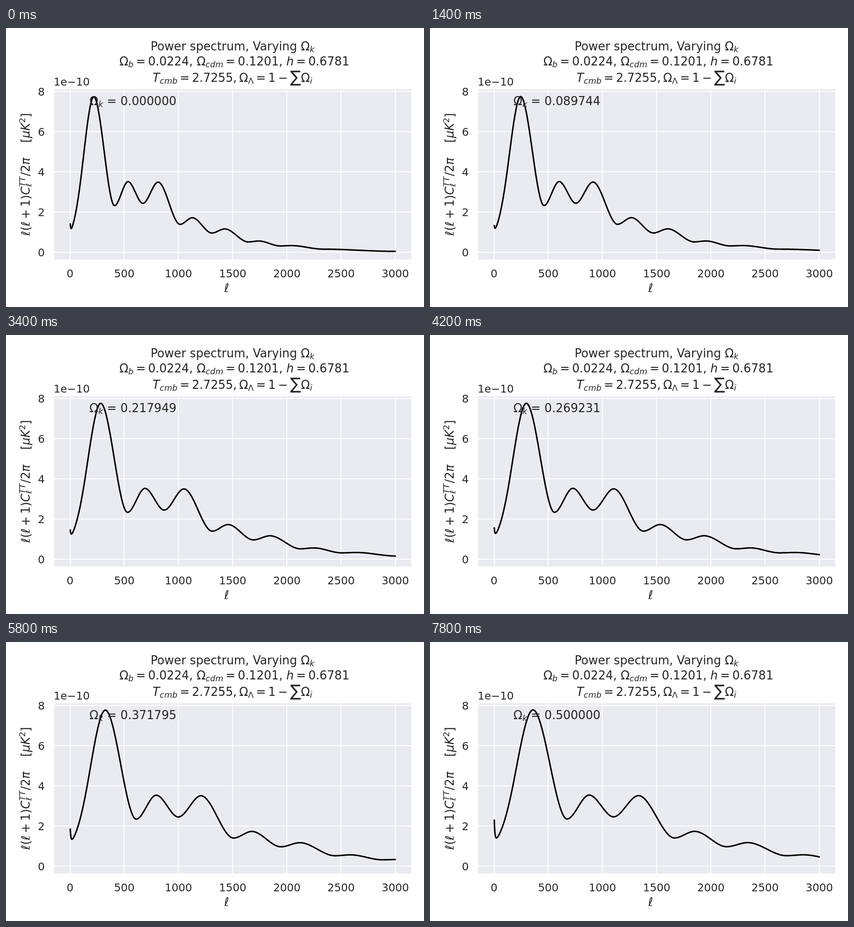
An HTML page that plays this animation: 917 by 611 pixels, repeating every 8000 ms.

```html
<!DOCTYPE html>
<html lang="en">
<head>
<meta charset="utf-8">
<title>Power spectrum</title>
<style>
  html, body { margin: 0; width: 100%; height: 100%; overflow: hidden; background: #fff; }
  svg { display: block; }
  text { font: 25.75px "DejaVu Sans", sans-serif; fill: #262626; white-space: pre; }
  .mid { text-anchor: middle; }
  .end { text-anchor: end; }
  .tick { font-size: 23.6px; }
  .it { font-style: italic; }
  .sub, .sup { font-size: 18px; baseline-shift: -4px; }
  .sup { baseline-shift: 10px; }
</style>
</head>
<body>
<svg id="stage" width="917" height="611" viewBox="0 0 917 611">
  <rect x="106" y="134" width="783" height="373" fill="#eaeaf1"/>
  <path id="grid" stroke="#fff" stroke-width="2.1"/>
  <path id="curve" fill="none" stroke="#000" stroke-width="3.2" stroke-linecap="round" stroke-linejoin="round"/>

  <!-- Thin spaces surround the operators -->
  <text x="497" y="49" class="mid">Power spectrum, Varying Ω<tspan class="sub it">k</tspan></text>
  <text x="501" y="81.5" class="mid">Ω<tspan class="sub it">b</tspan>&#8201;=&#8201;0.0224, Ω<tspan class="sub it">cdm</tspan>&#8201;=&#8201;0.1201, <tspan class="it">h</tspan>&#8201;=&#8201;0.6781</text>
  <text x="321.5" y="117.5"><tspan class="it">T</tspan><tspan class="sub it">cmb</tspan>&#8201;=&#8201;2.7255,&#8201;Ω<tspan class="sub">Λ</tspan>&#8201;=&#8201;1&#8201;−<tspan x="647">Ω</tspan><tspan class="sub it">i</tspan></text>
  <path fill="#262626" d="M624 93.5H645.5V97H629.5L640 109L629 122.5H646.5V126H623.5V123.5L635.5 109.5L624 96Z"/>
  <text transform="translate(52 455) rotate(-90)"><tspan class="it">ℓ</tspan>(<tspan class="it">ℓ</tspan>&#8201;+&#8201;1)<tspan class="it">C</tspan><tspan class="sup it">TT</tspan><tspan class="sub it" dx="-22">ℓ</tspan><tspan dx="15.5">/2</tspan><tspan class="it">π</tspan>    [<tspan class="it">μK</tspan><tspan class="sup">2</tspan>]</text>
  <text x="484" y="578" class="mid it">ℓ</text>
  <text x="104.5" y="126" class="tick">1e−10</text>
  <text x="183" y="169">Ω<tspan class="sub it">k</tspan> = <tspan id="value"></tspan></text>
</svg>
<script>
const $ = id => document.getElementById(id);
const X0 = 140.5, Y0 = 491, WIDTH = 713.5;

function tickLabel(x, y, str, align) {
  const t = document.createElementNS("http://www.w3.org/2000/svg", "text");
  t.setAttribute("x", x);
  t.setAttribute("y", y);
  t.setAttribute("class", "tick " + align);
  t.textContent = str;
  $("stage").append(t);
}

let grid = "";
for (let i = 0; i <= 6; i++) {
  const x = X0 + WIDTH * i / 6;
  grid += `M${Math.round(x)} 134V507`;
  tickLabel(x, 546, i * 500, "mid");
}
for (let i = 0; i <= 4; i++) {
  const y = Y0 - 88.1 * i;
  grid += `M106 ${Math.round(y)}H889`;
  tickLabel(85, y + 9, i * 2, "end");
}
$("grid").setAttribute("d", grid);

// Peaks and troughs of the flat-universe curve: [distance from the axis, y, slope if any]
const knots = [
  [0, 446, -1.5], [23.8, 329, -8], [52.1, 150.5], [97.6, 389], [127.2, 336.5],
  [159.8, 384], [193.3, 337.5], [241.3, 430], [268.3, 415.5], [311.2, 449],
  [339.3, 440], [391, 468.5], [414, 466.5], [461, 477.3], [486, 476.5],
  [555, 484.3], [714, 489.2]
];

// Cubic Hermite curve through the knots
function base(u) {
  const i = Math.max(1, knots.findIndex(p => u <= p[0]));
  const [x0, y0, s0 = 0] = knots[i - 1], [x1, y1, s1 = 0] = knots[i];
  const h = x1 - x0, q = (u - x0) / h, p = 1 - q;
  return y0 + (y1 - y0) * q * q * (3 - 2 * q) + h * q * p * (s0 * p - s1 * q);
}

// Curvature k stretches the curve sideways, lifts it a little and changes the first spike.
function draw(k) {
  const stretch = 1 + k * (1.39 - 0.22 * k);
  const spike = 16 - 94 * k + 438 * k ** 2 - 268 * k ** 3;
  const points = [];
  for (let x = 0.5; x <= WIDTH; x += 0.5) {
    const u = x / stretch;
    const lift = k * (18 * Math.exp(-u / 12) + 4 * Math.exp(-u / 300));
    const y = base(u) - lift - spike * Math.exp((0.5 - x) / (1 + 0.8 * k));
    points.push(`${(X0 + x).toFixed(2)} ${y.toFixed(2)}`);
  }
  $("curve").setAttribute("d", "M" + points.join("L"));
  $("value").textContent = k.toFixed(6);
}

let shown = -1;
function tick() {
  const step = Math.floor(performance.now() % 8000 / 200);
  if (step !== shown) draw(0.5 * step / 39);
  shown = step;
  requestAnimationFrame(tick);
}
tick();
</script>
</body>
</html>
```
